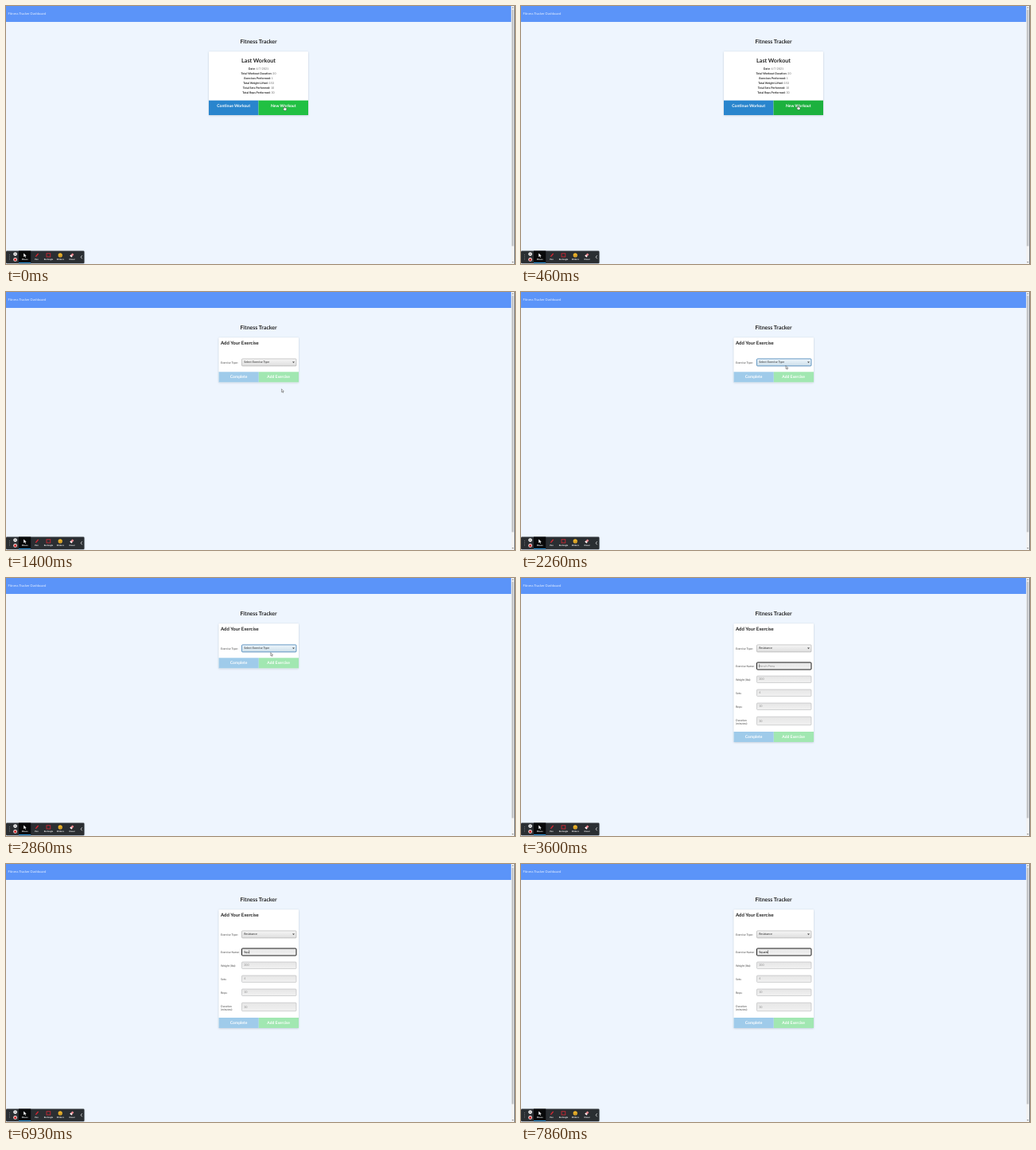
An HTML page for the animation above (8000 ms loop, 640 px wide and 324 px high).

```html
<!DOCTYPE html>
<html lang="en">
<head>
<meta charset="utf-8">
<title>Fitness Tracker</title>
<style>
  html, body { margin: 0; width: 100%; height: 100%; overflow: hidden; background: #eef5fe; }
  svg { display: block; width: 100vw; height: 100vh; }
  text { font-family: Lato, sans-serif; white-space: pre; text-rendering: geometricPrecision; }
</style>
</head>
<body>
<svg id="stage" viewBox="0 0 640 324">
  <defs>
    <linearGradient id="field" x2="0" y2="1">
      <stop stop-color="#e6e6e6"/><stop offset="1" stop-color="#f1f1f1"/>
    </linearGradient>
    <linearGradient id="select" x2="0" y2="1">
      <stop stop-color="#f6f6f6"/><stop offset="1" stop-color="#dedede"/>
    </linearGradient>
    <linearGradient id="active" x2="0" y2="1">
      <stop stop-color="#eef6fc"/><stop offset="1" stop-color="#cddfea"/>
    </linearGradient>
    <filter id="shadow" x="-10%" y="-10%" width="120%" height="125%">
      <feDropShadow dx="0" dy=".6" stdDeviation=".9" flood-color="#6d7f92" flood-opacity=".4"/>
    </filter>
  </defs>
</svg>
<script>
const LOOP = 8000;
const stage = document.getElementById('stage');

function add(parent, tag, attrs = {}, content) {
  const el = document.createElementNS('http://www.w3.org/2000/svg', tag);
  for (const key in attrs) el.setAttribute(key, attrs[key]);
  if (content !== undefined) el.textContent = content;
  parent.append(el);
  return el;
}
const group = (parent, attrs) => add(parent, 'g', attrs);
const rect = (parent, x, y, width, height, fill, more = {}) =>
  add(parent, 'rect', { x, y, width, height, fill, ...more });
const label = (parent, x, y, size, fill, content, more = {}) =>
  add(parent, 'text', { x, y, 'font-size': size, fill, ...more }, content);
const bold = { 'font-weight': 700 };
const centred = { 'text-anchor': 'middle' };
const heading = { ...bold, ...centred };
const show = (el, on) => el.setAttribute('visibility', on ? 'inherit' : 'hidden');

// Page frame
rect(stage, 0, 0, 640, 324, '#eef5fe');
rect(stage, 0, 0, 635.5, 20, '#5b94f9');
label(stage, 2.5, 10.5, 4.16, '#e6efff', 'Fitness Tracker Dashboard');
label(stage, 317.5, 47.2, 6.95, '#222', 'Fitness Tracker', heading);
rect(stage, 635.3, 0, 4.7, 324, '#f3f3f3');
rect(stage, 635.8, 4.5, 2.6, 297, '#c3c5c8');
rect(stage, 639, 0, 1, 324, '#777b80');
add(stage, 'path', { d: 'M636 2.6l1.2-1.4 1.2 1.4zM636 321.2l1.2 1.4 1.2-1.4z', fill: '#666' });

// Summary of the last workout
const summary = group(stage);
rect(summary, 255, 57.3, 125, 79.7, '#fff', { rx: 1, filter: 'url(#shadow)' });
label(summary, 317.5, 71, 7.1, '#222', 'Last Workout', heading);
[
  ['Date', '4/7/2021'],
  ['Total Workout Duration', '20'],
  ['Exercises Performed', '1'],
  ['Total Weight Lifted', '150'],
  ['Total Sets Performed', '10'],
  ['Total Reps Performed', '30']
].forEach(([name, value], i) => {
  const line = label(summary, 317.5, 79.8 + i * 6, 3.6, '#666', undefined, centred);
  add(line, 'tspan', { ...bold, fill: '#222' }, name + ':');
  add(line, 'tspan', {}, ' ' + value);
});
rect(summary, 255, 118.6, 62.5, 18.4, '#2985cd');
const newButton = rect(summary, 317.5, 118.6, 62.5, 18.4, '#21ba45');
label(summary, 286.2, 127, 5.05, '#fff', 'Continue Workout', heading);
label(summary, 348.8, 127, 5.05, '#fff', 'New Workout', heading);

// Exercise form
const form = group(stage);
const card = rect(form, 267.5, 57.3, 100.5, 56, '#fff', { rx: 1, filter: 'url(#shadow)' });
label(form, 270, 66, 6, '#222', 'Add Your Exercise', bold);
const buttons = group(form);
rect(buttons, 267.5, 0, 50.3, 13, '#9fcbea');
rect(buttons, 317.8, 0, 50.2, 13, '#a1e7b1');
label(buttons, 292.6, 8.2, 5, '#fff', 'Complete', heading);
label(buttons, 342.6, 8.2, 5, '#fff', 'Add Exercise', heading);

const caption = (parent, y, content) => label(parent, 270, y, 3.5, '#444', content);
const box = (parent, y, height, fill = 'url(#field)') =>
  rect(parent, 296.5, y, 68.5, height, fill, { rx: 1, stroke: '#a9abad', 'stroke-width': .5 });

caption(form, 89.6, 'Exercise Type:');
const typeBox = box(form, 83.9, 9);
const typeText = label(form, 299.2, 89.4, 3.6, '#222', '');
add(form, 'path', { d: 'M360 87.5h3l-1.5 1.8z', fill: '#444' });

const details = group(form);
const rows = [
  [106, 9, 'Exercise Name:', 'Bench Press'],
  [123, 8.5, 'Weight (lbs):', '200'],
  [140, 8.5, 'Sets:', '4'],
  [157, 8.5, 'Reps:', '10'],
  [174.2, 10.5, '', '30']
].map(([y, height, name, hint]) => {
  const mid = y + height / 2;
  caption(details, mid + 1.4, name);
  return { frame: box(details, y, height), hint: label(details, 299.2, mid + 1.1, 3.75, '#8c8c8c', hint) };
});
caption(details, 179.6, 'Duration');
caption(details, 184.2, '(minutes):');
const [nameRow] = rows;
const typed = label(details, 299.2, 111.6, 3.85, '#111', '');
const caret = rect(details, 299, 108.2, .4, 4.4, '#111');

// Annotation toolbar
const bar = group(stage);
rect(bar, 0, 307.5, 98.5, 15.8, '#2c2d30', { rx: 1.2, filter: 'url(#shadow)' });
rect(bar, 16, 307.5, 15.2, 15.8, '#08090a');
rect(bar, 16, 321.9, 15.2, 1.1, '#2d8fd0');
for (let i = 0; i < 4; i++) rect(bar, 4, 312.2 + i * 1.9, .8, .8, '#8a8d90');
add(bar, 'circle', { cx: 11.6, cy: 311.6, r: 2.4, fill: '#eee' });
add(bar, 'path', { d: 'M10.6 310.6l2 2m0-2l-2 2', stroke: '#555', 'stroke-width': .5 });
add(bar, 'circle', { cx: 11.6, cy: 318.4, r: 2.4, fill: '#f3dede' });
add(bar, 'circle', { cx: 11.6, cy: 318.4, r: 1.5, fill: '#d22a2a' });
['Mouse', 'Pen', 'Rectangle', 'Stickers', 'Eraser'].forEach((name, i) =>
  label(bar, 23.6 + i * 14.9, 319.3, 2.6, '#fff', name, heading));
add(bar, 'path', { d: 'M22.2 310.4v4.8l1.2-1.1 .8 1.7 .8-.4-.8-1.6h1.5z', fill: '#fff' });
add(bar, 'path', { d: 'M37 315.2l.5-1.6 2.6-3.2 1 .9-2.6 3.1z', fill: '#d92632' });
rect(bar, 51, 310.8, 4.8, 4.2, 'none', { stroke: '#d92632', 'stroke-width': .8 });
add(bar, 'circle', { cx: 68.2, cy: 312.9, r: 2.6, fill: '#f3b92c' });
add(bar, 'path', { d: 'M66.7 313.3q1.5 2 3 0M67.2 311.8h.5M68.8 311.8h.5', fill: 'none', stroke: '#70420c', 'stroke-width': .5 });
add(bar, 'path', { d: 'M80.4 313.7l3-3.3 2 1.7-3 3.3z', fill: '#ef8a92' });
add(bar, 'path', { d: 'M80.4 313.7l1-1.1 2 1.7-1 1.1z', fill: '#fff' });
add(bar, 'path', { d: 'M95.6 313.3l-1.4 2 1.4 2', fill: 'none', stroke: '#fff', 'stroke-width': .7 });

// Pointer shapes, hot spot at 0,0
const pointer = group(stage);
const outline = { fill: '#fff', stroke: '#222', 'stroke-width': .4, 'stroke-linejoin': 'round' };
const hand = add(pointer, 'path', { ...outline, d: 'M-.5 0q.5-.5 1 0v1.8l2 .5q.5.2.4.8l-.5 2.1h-2.7l-1.5-2.3q.2-.7.9-.2l.4.4z' });
const arrow = add(pointer, 'path', { ...outline, d: 'M0 0v4l.9-.8.7 1.5.7-.3-.7-1.5h1.2z' });

const PRESS = 900, OPEN = 1200, SELECT = 2200, CHOOSE = 2930, FOCUS = 3460;
const keys = [[5130, 'S'], [5460, 'q'], [5570, 'u'], [6980, 'a'], [7260, 't'], [7620, 's']];
const path = [
  [0, 350, 126], [60, 350, 126], [560, 348, 125], [1300, 348, 125], [1660, 340, 108],
  [2200, 333, 92.5], [2800, 333, 92.5], [3060, 331, 101], [3460, 328, 110]
];

function place(t) {
  const next = path.findIndex(p => p[0] > t);
  if (next < 0) return path[path.length - 1].slice(1);
  const [t0, x0, y0] = path[next - 1], [t1, x1, y1] = path[next];
  const k = (t - t0) / (t1 - t0), ease = k * k * (3 - 2 * k);
  return [x0 + (x1 - x0) * ease, y0 + (y1 - y0) * ease];
}

function render(t) {
  const onForm = t >= OPEN, chosen = t >= CHOOSE, focused = t >= FOCUS;
  show(summary, !onForm);
  show(form, onForm);
  show(details, onForm && chosen);
  newButton.setAttribute('fill', t < 100 ? '#21c043' : t < PRESS ? '#1cb13e' : '#1fa83a');

  const bottom = chosen ? 193 : 100.3;
  card.setAttribute('height', bottom + 13 - 57.3);
  buttons.setAttribute('transform', `translate(0 ${bottom})`);

  const picking = t >= SELECT && !chosen;
  typeBox.setAttribute('fill', picking ? 'url(#active)' : 'url(#select)');
  typeBox.setAttribute('stroke', picking ? '#3f7fb5' : '#999');
  typeBox.setAttribute('stroke-width', picking ? .8 : .5);
  typeText.textContent = chosen ? 'Resistance' : 'Select Exercise Type';

  nameRow.frame.setAttribute('stroke', focused ? '#1c1c1c' : '#a9abad');
  nameRow.frame.setAttribute('stroke-width', focused ? 1 : .5);
  const done = keys.filter(k => k[0] <= t);
  const word = done.map(k => k[1]).join('');
  const last = done.length ? done[done.length - 1][0] : FOCUS;
  typed.textContent = word;
  show(nameRow.hint, chosen && !word);
  nameRow.hint.setAttribute('visibility', onForm && chosen && !word ? 'inherit' : 'hidden');
  caret.setAttribute('x', 299 + (word ? typed.getComputedTextLength() + .3 : 0));
  show(caret, focused && (t - last) % 1060 < 530);

  const [x, y] = place(t);
  pointer.setAttribute('transform', `translate(${x} ${y})`);
  show(pointer, !focused);
  show(hand, !onForm);
  show(arrow, onForm);
}

const start = performance.now();
function tick() {
  render((performance.now() - start) % LOOP);
  requestAnimationFrame(tick);
}
tick();
</script>
</body>
</html>
```
